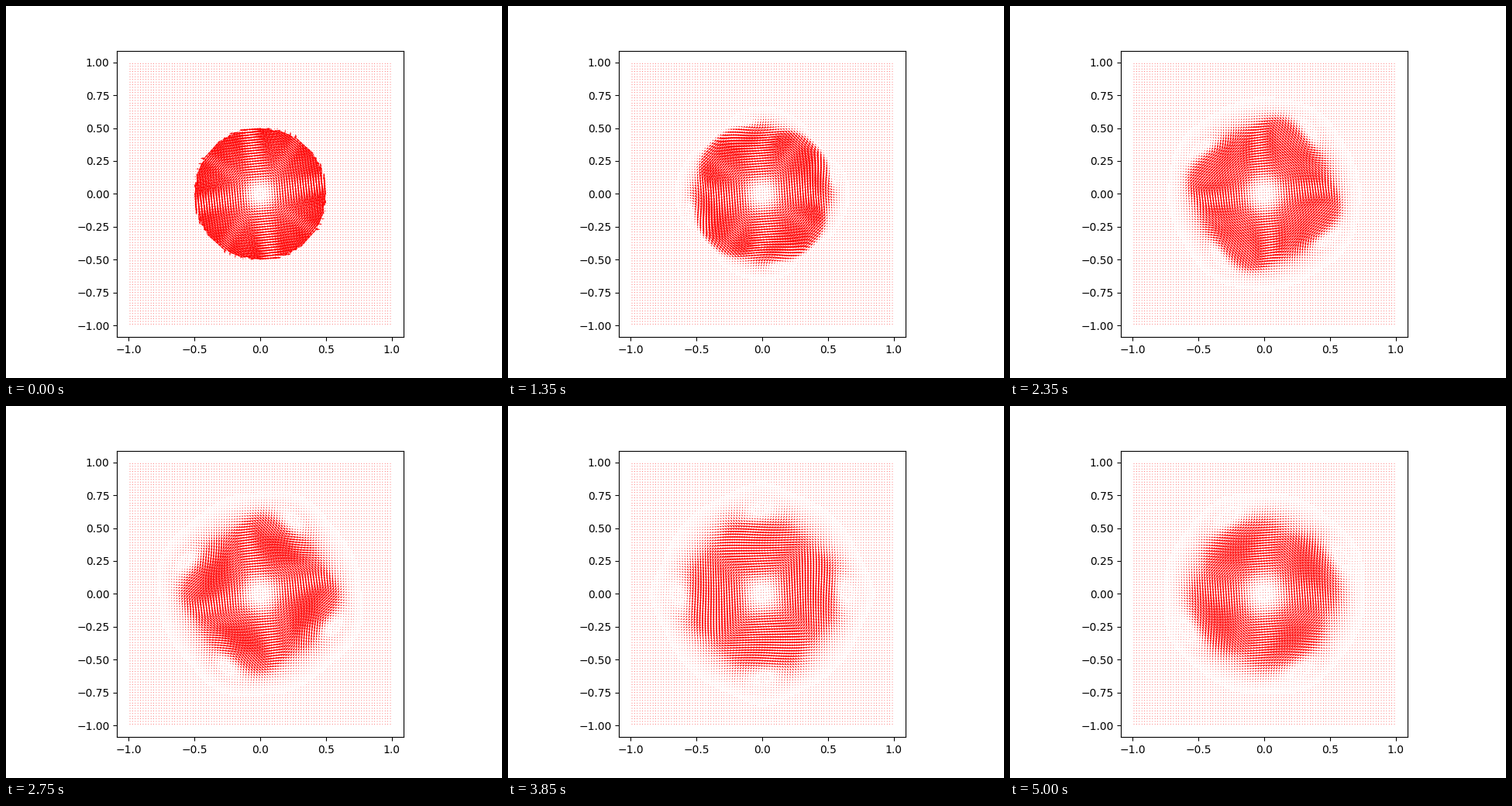
These frames come from a looping animation (640 px wide and 480 px high, 5050 ms). A matplotlib script:

```python
import numpy as np
import matplotlib.pyplot as plt
from matplotlib.animation import FuncAnimation

N = 100            # cells per side of the box [-1, 1] x [-1, 1]
H = 2 / N
DT = 0.1
FRAMES = 101

edge = np.linspace(-1, 1, N + 1)
mid = (edge[1:] + edge[:-1]) / 2

# staggered grid: u sits on vertical faces, v on horizontal ones
UX, UY = np.meshgrid(edge, mid)
VX, VY = np.meshgrid(mid, edge)

# cosine basis that diagonalises the Neumann Laplacian
k = np.arange(N)
basis = np.cos(np.pi * np.outer(k, k + 0.5) / N) * np.sqrt(2 / N)
basis[0] /= np.sqrt(2)
eig = (2 * np.cos(np.pi * k / N) - 2) / H**2
lap = eig[:, None] + eig[None, :]
lap[0, 0] = 1


def sample(f, x, y, x0, y0):
    """Bilinear lookup of f, whose first node lies at (x0, y0)."""
    rows, cols = f.shape
    gx = np.clip((x - x0) / H, 0, cols - 1.000001)
    gy = np.clip((y - y0) / H, 0, rows - 1.000001)
    i, j = gx.astype(int), gy.astype(int)
    a, b = gx - i, gy - j
    low = f[j, i] * (1 - a) + f[j, i + 1] * a
    high = f[j + 1, i] * (1 - a) + f[j + 1, i + 1] * a
    return low * (1 - b) + high * b


def velocity(u, v, x, y):
    return sample(u, x, y, -1, mid[0]), sample(v, x, y, mid[0], -1)


def trace_back(u, v, x, y):
    p, q = velocity(u, v, x, y)
    p, q = velocity(u, v, x - DT / 2 * p, y - DT / 2 * q)
    return x - DT * p, y - DT * q


def advect(u, v):
    new_u = sample(u, *trace_back(u, v, UX, UY), -1, mid[0])
    new_v = sample(v, *trace_back(u, v, VX, VY), mid[0], -1)
    return new_u, new_v


def project(u, v):
    """Remove the divergence, with solid walls around the box."""
    u[:, [0, -1]] = 0
    v[[0, -1]] = 0
    div = (np.diff(u, axis=1) + np.diff(v, axis=0)) / H
    p = basis.T @ ((basis @ div @ basis.T) / lap) @ basis
    u[:, 1:-1] -= np.diff(p, axis=1) / H
    v[1:-1] -= np.diff(p, axis=0) / H
    return u, v


def centred(u, v):
    return (u[:, 1:] + u[:, :-1]) / 2, (v[1:] + v[:-1]) / 2


def simulate():
    u = np.where(np.hypot(UX, UY) < 0.5, -UY, 0)
    v = np.where(np.hypot(VX, VY) < 0.5, VX, 0)
    states = [centred(u, v)]
    while len(states) < FRAMES:
        u, v = project(*advect(u, v))
        states.append(centred(u, v))
    return states


states = simulate()

fig, ax = plt.subplots(figsize=(6.4, 4.8), dpi=100)
ax.set_aspect("equal")
scale = 1.8 * N * np.hypot(*states[0]).mean()
arrows = ax.quiver(mid, mid, *states[0], color="red", scale=scale)


def draw(i):
    arrows.set_UVC(*states[i])
    return (arrows,)


anim = FuncAnimation(fig, draw, frames=FRAMES, interval=50, repeat=True)
plt.show()
```
